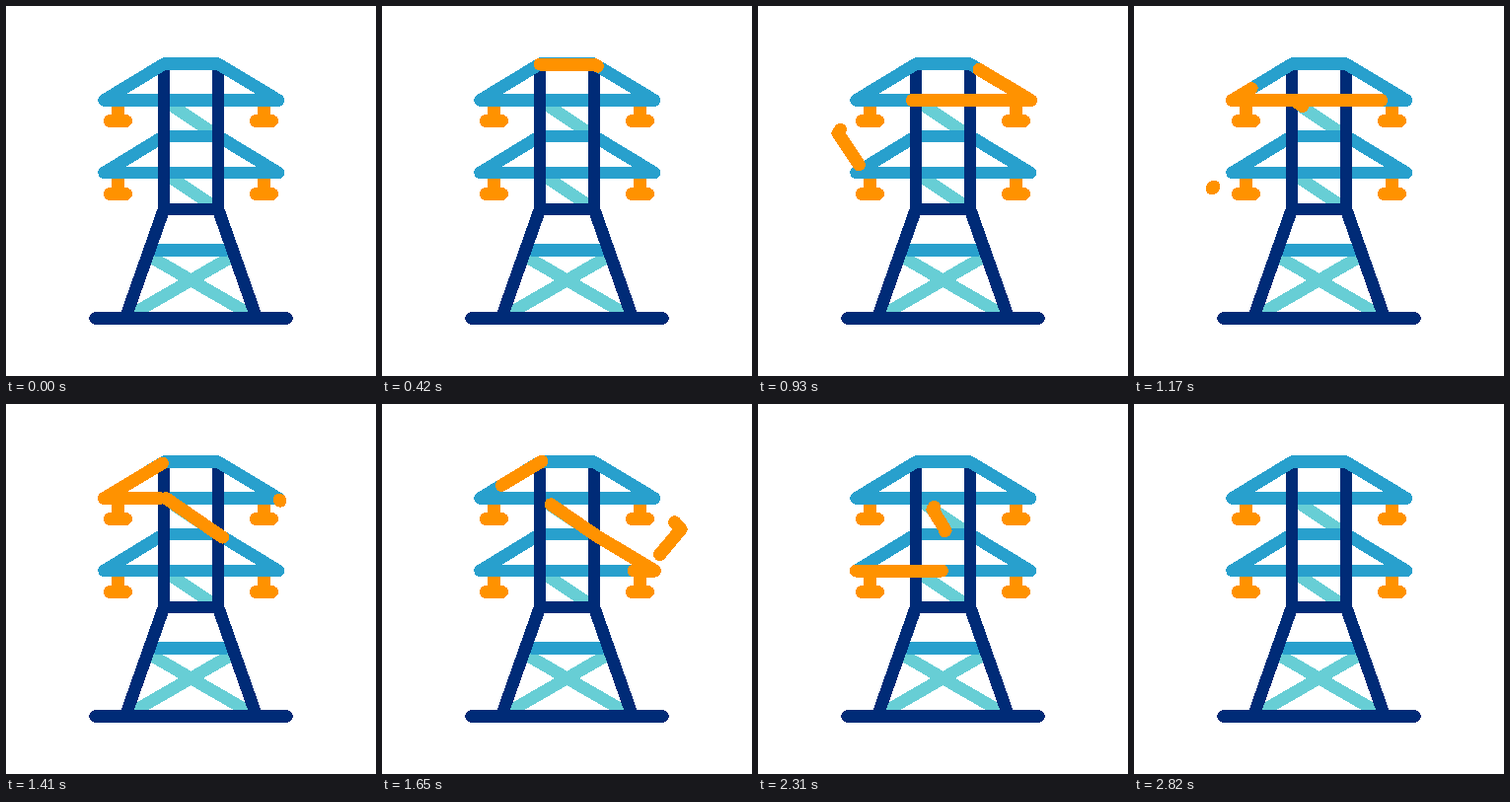
Write an HTML page that moves like this. It is 375 px wide and 375 px high and loops after 4530 ms.

```html
<!DOCTYPE html>
<html lang="en">
<head>
<meta charset="utf-8">
<title>Power line</title>
<style>
  html, body { margin: 0; width: 100%; height: 100%; overflow: hidden; background: #fff; }
  svg { display: block; width: 100%; height: 100%; shape-rendering: crispEdges; }
  path { fill: none; stroke-width: 12.5; stroke-linecap: round; stroke-linejoin: round; }
  .teal { stroke: #67ced5; }
  .blue { stroke: #28a0cd; }
  .navy { stroke: #002b77; }
  .orange, #current path { stroke: #ff9200; stroke-width: 13; }
</style>
</head>
<body>
<svg viewBox="0 0 375 375">
  <path class="teal" d="M160 95.5L215 132M160 169L215 206M146 254L250 314M229 254L125 314"/>
  <path class="orange" d="M113.5 98V116M261.5 98V116M113.5 172V190M261.5 172V190
    M105.5 116.5H121.5M253.5 116.5H269.5M105.5 190.5H121.5M253.5 190.5H269.5"/>
  <path class="blue" d="M160 132H215L276 169H99.5ZM152 247.5H223M99.5 95.5H276"/>
  <path class="navy" d="M160 64V206H215V64M160 206L121 316.5M215 206L254 316.5M90.5 316.5H284.5"/>
  <path class="blue" d="M99.5 95.5L160.5 58.5H214.5L276 95.5"/>
  <g id="current"></g>
</svg>
<script>
const LOOP = 4530;
const MIN_VISIBLE = 1.2;
const layer = document.getElementById('current');

// Each stroke is drawn by its head and wiped by its tail: [start, duration] in ms.
const stroke = (d, head, tail) => {
  const path = document.createElementNS(layer.namespaceURI, 'path');
  path.setAttribute('d', d);
  layer.append(path);
  return { path, head, tail, length: path.getTotalLength() };
};
const bolt = (d, start) => stroke(d, [start, 450], [start + 118, 450]);

const strokes = [
  stroke('M160 59H215L276.5 95.5H99.5L162 58', [60, 1440], [558, 1405]),
  stroke('M162 95.5L218 134L276.5 169H99.5', [1037, 1223], [1513, 1222]),
  bolt('M103 97L81 129L102.5 161L79 185', 646),
  bolt('M277 97L303 127L277 158L297 183', 1380),
  bolt('M190 84L177 107L190 128L177 148', 2026)
];

const ease = (t, [start, duration]) => {
  const s = Math.min(1, Math.max(0, (t - start) / duration));
  return s * s * (3 - 2 * s);
};

function draw(now) {
  const t = now % LOOP;
  for (const { path, head, tail, length } of strokes) {
    const from = ease(t, tail) * length;
    const visible = ease(t, head) * length - from;
    path.style.display = visible > MIN_VISIBLE ? '' : 'none';
    path.setAttribute('stroke-dasharray', `${Math.max(0, visible)} ${length * 2}`);
    path.setAttribute('stroke-dashoffset', -from);
  }
}

const origin = performance.now();
function tick() {
  draw(performance.now() - origin);
  requestAnimationFrame(tick);
}
tick();
</script>
</body>
</html>
```
